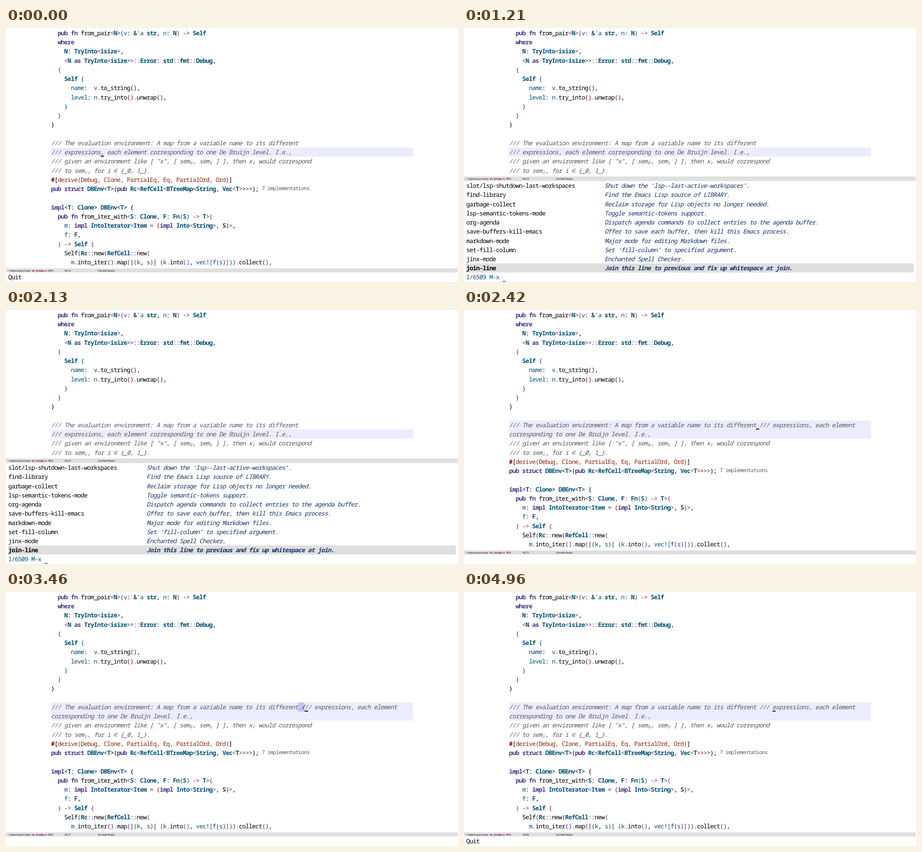
Write an HTML page that moves like this. It is 998 px wide and 561 px high and loops after 5 s.

```html
<!DOCTYPE html>
<html lang="en">
<head>
<meta charset="utf-8">
<title>Joining comment lines</title>
<style>
  html, body { margin: 0; width: 100%; height: 100%; overflow: hidden; background: #fff; }
  #stage { position: absolute; left: 0; top: 0; width: 998px; height: 561px; overflow: hidden; color: #000; }
  #stage div { position: absolute; }
  .row {
    --cell: 7.27px;
    white-space: pre;
    font: 13.5px/20.25px 'Noto Sans Mono', 'DejaVu Sans Mono', monospace;
    letter-spacing: calc(var(--cell) - .6em);
    font-variant-ligatures: none;
    text-rendering: geometricPrecision;
  }
  .keyword { color: #4a3a8a; font-weight: bold; }
  .type { color: #005077; font-weight: bold; }
  .name, .prompt { color: #005077; }
  .op { color: #731c52; }
  .attr { color: #8a290f; }
  .attr b { color: #7f0000; }
  .attr i { color: #000; font-style: normal; }
  .comment { color: #595959; font-style: italic; }
  .comment u { color: #c02020; text-decoration: none; }
  .lens { --cell: 6.2px; font-size: 11.5px; color: #595959; }
  .doc { color: #193668; font-style: italic; }
  .chosen { font-weight: bold; }
  .region { display: inline-block; background: #bdc3fb; color: #000; }
  #band { left: 99px; width: 800px; background: #ececff; }
  #panel { left: 0; width: 998px; bottom: 0; background: #fff; }
  #mode { left: 0; top: 0; width: 997px; height: 9.5px; background: #dfdfdf; }
  #mode div { top: 0; white-space: pre; font: 6.3px/9.5px 'Liberation Serif', serif; }
  #mode .file { font-weight: bold; color: #8a1030; }
  #pick { left: 5px; top: 520px; width: 988px; height: 20.3px; background: #dfdfdf; }
  #cursor { width: 7.3px; height: 1.6px; background: #000; }
</style>
</head>
<body>
<div id="stage"></div>
<script>
const CELL = 7.27, ROW = 20.25, LEFT = 99.5, TOP = 0.9, ECHO = 540.4;
const LOOP = 5000, OPEN = 1205, JOIN = 2165, MARK = 3000, MOVE = 3220, STEP = 232, QUIT = 4535;

const CODE = `  pub fn from_pair<N>(v: &'a str, n: N) -> Self
  where
    N: TryInto<isize>,
    <N as TryInto<isize>>::Error: std::fmt::Debug,
  {
    Self {
      name:  v.to_string(),
      level: n.try_into().unwrap(),
    }
  }
}

/// The evaluation environment: A map from a variable name to its different
/// expressions, each element corresponding to one De Bruijn level. I.e.,
/// given an environment like [ "x", [ sem₀, sem₁ ] ], then xᵢ would correspond
/// to semᵢ, for i ∈ {_0, 1_}.
#[derive(Debug, Clone, PartialEq, Eq, PartialOrd, Ord)]
pub struct DBEnv<T>(pub Rc<RefCell<BTreeMap<String, Vec<T>>>>);

impl<T: Clone> DBEnv<T> {
  pub fn from_iter_with<S: Clone, F: Fn(S) -> T>(
    m: impl IntoIterator<Item = (impl Into<String>, S)>,
    f: F,
  ) -> Self {
    Self(Rc::new(RefCell::new(
      m.into_iter().map(|(k, s)| (k.into(), vec![f(s)])).collect(),`.split('\n');

const COMMANDS = [
  ['slot/lsp-shutdown-last-workspaces', 'Shut down the ‘lsp--last-active-workspaces’.'],
  ['find-library', 'Find the Emacs Lisp source of LIBRARY.'],
  ['garbage-collect', 'Reclaim storage for Lisp objects no longer needed.'],
  ['lsp-semantic-tokens-mode', 'Toggle semantic-tokens support.'],
  ['org-agenda', 'Dispatch agenda commands to collect entries to the agenda buffer.'],
  ['save-buffers-kill-emacs', 'Offer to save each buffer, then kill this Emacs process.'],
  ['markdown-mode', 'Major mode for editing Markdown files.'],
  ['set-fill-column', 'Set ‘fill-column’ to specified argument.'],
  ['jinx-mode', 'Enchanted Spell Checker.'],
  ['join-line', 'Join this line to previous and fix up whitespace at join.'],
];

const RAINBOW = ['#000', '#731c52', '#005077', '#7f0000', '#624416', '#531ab6', '#006800', '#3548cf', '#8f0075'];
const TOKEN = /->|::|\b(?:pub|fn|where|as|impl|struct)\b|'a|vec!|\w+|[^\w\s]|\s+/g;
let depth = 1; // the enclosing impl block opens above the window

const esc = s => s.replace(/&/g, '&amp;').replace(/</g, '&lt;').replace(/>/g, '&gt;');
const span = (cls, s) => `<span class="${cls}">${esc(s)}</span>`;

function paintToken(s, at, line) {
  if (s.length === 1 && '([{<)]}>'.includes(s)) {
    const level = '([{<'.includes(s) ? depth++ : --depth;
    return `<span style="color:${RAINBOW[level % RAINBOW.length]}">${esc(s)}</span>`;
  }
  if (/^(pub|fn|where|as|impl|struct)$/.test(s)) return span('keyword', s);
  if (s === 'Self' && line[at + 4] === '(') return s;
  if (/^([A-Z]\w*|isize|str|std|fmt)$/.test(s)) return span('type', s);
  if (/^([a-z]|'a|vec!|name|level)$/.test(s)) return span('name', s);
  if (/^(->|::|=|\.)$/.test(s)) return span('op', s);
  return esc(s);
}

function paintLine(line) {
  if (line.startsWith('///')) return `<span class="comment">${line.replace(/_/g, '<u>_</u>')}</span>`;
  if (line.startsWith('#'))
    return `<span class="attr">${line.replace('#', '<b>#</b>').replace(/[[\]]/g, '<i>$&</i>')}</span>`;
  return line.replace(TOKEN, (s, at) => paintToken(s, at, line));
}

function add(parent, { html = '', x, y, cls = '', id = '' }) {
  const el = document.createElement('div');
  el.innerHTML = html;
  el.className = cls;
  el.id = id;
  if (x !== undefined) el.style.left = x + 'px';
  if (y !== undefined) el.style.top = y + 'px';
  return parent.appendChild(el);
}

const stage = document.getElementById('stage');
const band = add(stage, { id: 'band' });
const rows = CODE.map((line, i) =>
  add(stage, { html: paintLine(line), x: LEFT, y: TOP + i * ROW, cls: 'row' }));
add(stage, { html: '7 implementations', x: LEFT + 64 * CELL, y: TOP + 17 * ROW, cls: 'row lens' });

const panel = add(stage, { id: 'panel' });
const mode = add(panel, { id: 'mode' });
add(mode, { html: '~/repos/zq/src/expr/', x: 4.5 });
add(mode, { html: 'de_bruijn.rs', x: 57, cls: 'file' });
add(mode, { html: '38%', x: 92.5 });
const position = add(mode, { x: 129 });
add(mode, { html: 'Git-bidi Rustic', x: 203 });

const list = add(stage, { x: 0, y: 0 });
add(list, { id: 'pick' });
COMMANDS.forEach(([name, doc], i) => {
  const y = 338.2 + i * 20.22, chosen = i === COMMANDS.length - 1 ? ' chosen' : '';
  add(list, { html: name, x: 5, y, cls: 'row' + chosen });
  add(list, { html: doc, x: 5 + 42 * CELL, y, cls: 'row doc' + chosen });
});
const echo = add(stage, { x: 5, y: ECHO, cls: 'row' });
const cursor = add(stage, { id: 'cursor' });

const [first, second] = CODE.slice(12, 14);
const split = second.indexOf(' corresponding');
const joined = first + ' ' + second.slice(0, split);
const rest = second.slice(split + 1);

function stateAt(t) {
  const isJoined = t >= JOIN, prompt = t >= OPEN && !isJoined;
  const steps = Math.floor((t - MOVE) / STEP) + 1;
  const col = isJoined ? 75 + Math.max(0, Math.min(5, steps)) : 15;
  const message = t < OPEN || t >= QUIT ? 'Quit'
    : prompt ? span('prompt', '1/6509 M-x')
    : t >= MARK && t < MOVE ? 'Mark set' : '';
  return { isJoined, prompt, col, message, active: isJoined && t < QUIT };
}

function render({ isJoined, prompt, col, message, active }) {
  const line = isJoined ? 12 : 13;
  const selected = active && col > 75
    ? joined.slice(0, 75) + span('region', joined.slice(75, col)) + joined.slice(col) : joined;
  rows[12].innerHTML = `<span class="comment">${isJoined ? selected : first}</span>`;
  rows[13].innerHTML = `<span class="comment">${isJoined ? rest : second}</span>`;
  band.style.top = TOP + line * ROW + 'px';
  band.style.height = (14 - line) * ROW + 'px';
  panel.style.top = (prompt ? 328.3 : 530.7) + 'px';
  list.style.display = prompt ? '' : 'none';
  position.textContent = `${isJoined ? 43 : 44},${col}`;
  echo.innerHTML = message;
  cursor.style.left = (prompt ? 5 + 11 * CELL : LEFT + col * CELL) + 'px';
  cursor.style.top = (prompt ? ECHO : TOP + line * ROW) + 18.3 + 'px';
}

let shown = '';
function tick() {
  const state = stateAt(performance.now() % LOOP), key = JSON.stringify(state);
  if (key !== shown) render(state);
  shown = key;
  requestAnimationFrame(tick);
}
tick();
</script>
</body>
</html>
```
